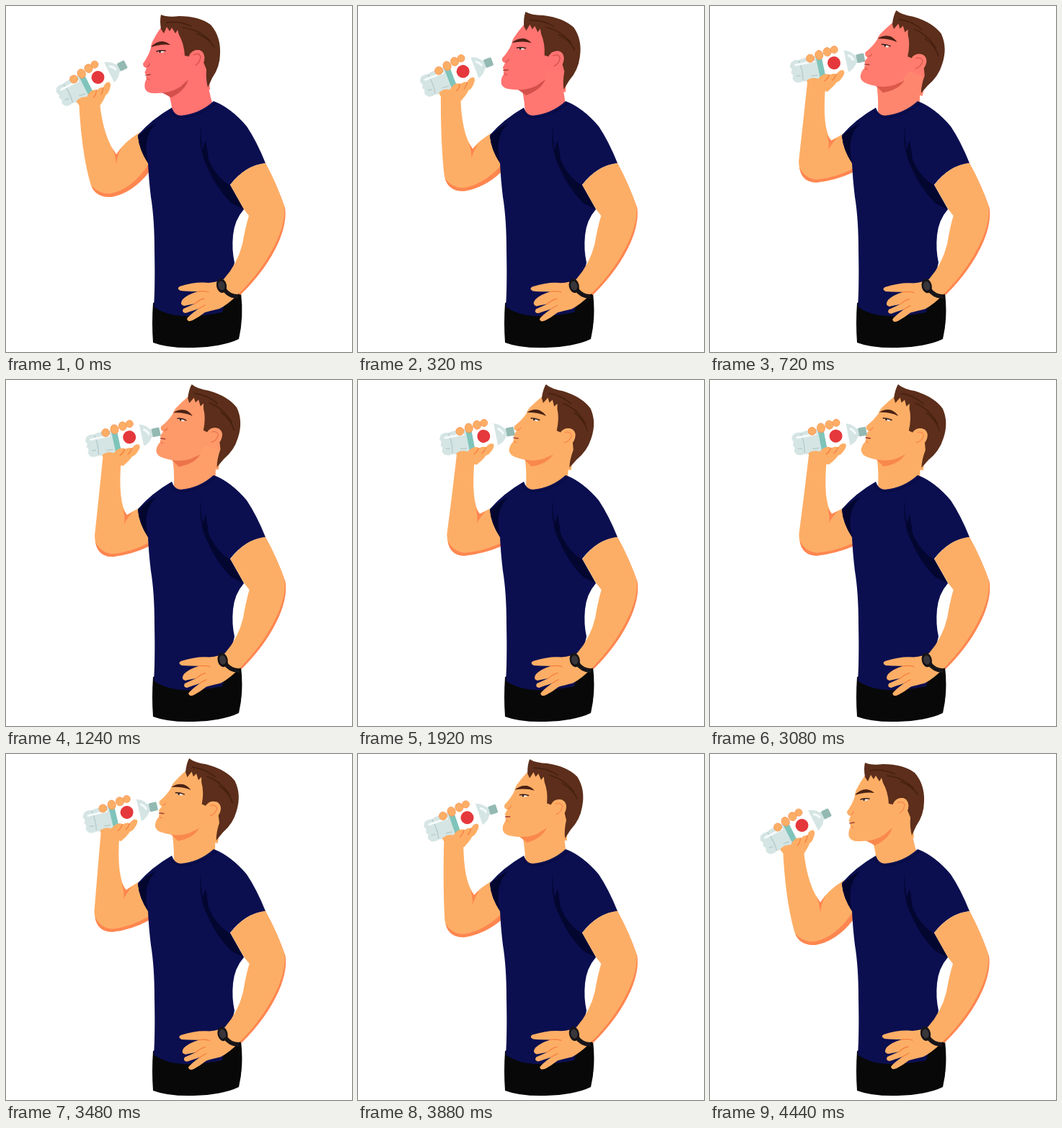
Write an HTML page that moves like this. It is 480 px wide and 480 px high and loops after 5000 ms.

```html
<!DOCTYPE html>
<html lang="en">
<head>
<meta charset="utf-8">
<title>Drinking water</title>
<style>
  html, body { margin: 0; width: 100%; height: 100%; overflow: hidden; background: #fff; }
  svg { display: block; width: 100%; height: 100%; }
  .skin { fill: #fdae66; }
  .shade { fill: #ff8650; }
  .line { fill: none; stroke: #f5803f; stroke-width: 1.3; stroke-linecap: round; }
  .face { fill: var(--face); }
  .neck { fill: var(--neck); }
  .faceShade { fill: var(--faceShade); }
  .faceLine { fill: none; stroke: var(--faceShade); stroke-width: 1.3; stroke-linecap: round; }
</style>
</head>
<body>
<svg viewBox="0 0 480 480">
  <path id="neck" class="neck"/>
  <path id="arm" class="skin"/>
  <path id="armShade" class="shade"/>
  <path id="crook" class="shade"/>

  <!-- shorts and shirt -->
  <path fill="#080808" d="M204 412 Q202 440 204 467 Q225 475 260 474 Q300 473 323 462 Q330 432 326 398 L300 380Z"/>
  <path fill="#0b0f50" d="M230 141 Q234 152 242 152 Q268 150 288 132 Q312 141 334 167 Q348 188 360 218 Q332 221 311 248 L330 282 Q317 297 315 318 Q313 338 317 356 L300 425 Q270 431 245 430 Q219 428 205 417 Q207 390 206 340 Q206 295 201 265 Q198 240 197 218 Q184 198 183 179 Q202 157 230 141Z"/>
  <path fill="#03062f" d="M209 162 Q192 178 195 206 L197 218 Q185 200 183 181 Q196 168 209 162Z"/>
  <path fill="#03062f" d="M270 166 Q267 200 279 223 Q291 252 313 274 L330 282 L311 249 Q292 238 281 213 Q279 196 277 187 Q274 194 273 200 Q270 185 270 166Z"/>
  <path fill="none" stroke="#060a3e" stroke-width="1.2" d="M227 144 Q234 156 244 155 Q272 152 292 134"/>

  <!-- arm resting on the hip -->
  <g id="hip">
    <path class="shade" d="M360 218 Q376 248 387 280 Q390 300 378 328 Q361 366 325 401 L312 390 L340 290Z"/>
    <path class="skin" d="M360 218 Q376 248 386 278 Q388 298 376 325 Q357 366 322 400 Q308 414 296 420 Q283 423 276 425 Q267 432 259 436 Q252 439 251 434 Q253 430 267 420 Q255 424 249 426 Q243 425 246 420 L262 413 Q252 415 247 416 Q240 414 245 407 Q252 400 266 396 Q252 396 242 395 Q236 392 241 389 Q264 382 281 384 Q294 383 302 379 Q321 358 328 330 Q332 307 337 291 L330 282 L311 248 Q332 221 360 218Z"/>
    <path class="line" d="M266 396 Q275 395 281 397 M262 413 Q269 407 275 406 M267 420 L276 415"/>
    <path fill="none" stroke="#17151a" stroke-width="6" d="M302 392 Q309 403 322 403"/>
    <ellipse cx="299" cy="388" rx="7" ry="10" fill="#151317" transform="rotate(-12 299 388)"/>
    <ellipse cx="299" cy="388" rx="4.6" ry="6.4" fill="#38363b" transform="rotate(-12 299 388)"/>
  </g>

  <g id="head">
    <path class="neck" d="M250 86 L280 84 L283 116 L262 118Z"/>
    <path class="faceShade" d="M214 119 Q240 116 253 102 Q249 117 229 127 Q224 124 214 119Z"/>
    <path class="face" d="M217 27 Q209 38 205 46 Q201 52 201 58 Q198 69 190 80 Q190 85 195 86 L193 91 Q191 93 196 96 Q193 98 195 101 Q191 108 193 115 Q196 121 205 121 Q227 122 242 112 Q252 104 255 88 L278 90 L274 55 L240 20Z"/>
    <path fill="#5c2e1b" d="M215 12 Q224 16 240 14 Q268 14 284 26 Q298 42 297 66 Q297 84 286 100 L280 113 Q277 102 278 88 L274 78 Q277 63 267 61 Q258 61 254 70 L248 69 Q247 52 240 40 L238 33 L235 38 L230 30 L227 35 L223 29 L219 38 L215 32 Q213 20 215 12Z"/>
    <path fill="none" stroke="#45200f" stroke-width="1.5" d="M222 23 Q240 20 257 28 M245 30 Q267 32 283 48 M264 38 Q281 44 289 57"/>
    <path class="face" d="M254 69 Q258 60 268 61 Q277 64 275 76 Q272 87 260 88 Q253 85 254 69Z"/>
    <path class="faceLine" d="M260 68 Q267 64 270 70 Q269 79 263 82"/>
    <path fill="#4a2114" d="M201 57 Q208 49 217 49 Q224 50 228 54 Q216 52 201 57Z"/>
    <path fill="#f4eee8" d="M210 64 L220 61 L218 65Z"/>
    <path fill="none" stroke="#3c1c16" stroke-width="1.5" stroke-linecap="round" d="M209 63 Q214 61 221 62"/>
    <circle cx="213.5" cy="63.5" r="1.4" fill="#2a2328"/>
    <path fill="none" stroke="#a43d32" stroke-width="1.6" stroke-linecap="round" d="M194 96 L200 95"/>
    <path class="faceLine" d="M196 84 Q199 83 199 80 M196 101 L199 102"/>
  </g>

  <!-- bottle drawn along its own axis, cap on the right -->
  <g id="bottle">
    <path class="skin" d="M-34 12 L-31 24 L-8 36 L2 28 L12 8 L-10 -14 L-28 -12Z"/>
    <path fill="#d5e5e4" d="M-49 -14 Q-44 -17 -38 -15 Q-32 -17 -26 -16 L24 -16 Q34 -14 39 -6 L42 -5 L42 5 L39 6 Q34 14 24 16 L-26 16 Q-32 17 -38 15 Q-44 17 -49 14 L-52 9 L-50 4 L-52 0 L-50 -4 L-52 -9Z"/>
    <path fill="none" stroke="#b5cccb" stroke-width="1.4" d="M-38 -14 Q-35 0 -38 14 M-46 6 L-40 7 M-26 10 L-17 11"/>
    <path fill="none" stroke="#f5fbfa" stroke-width="3" stroke-linecap="round" d="M-44 -9 H-18 M31 -7 Q35 -4 36 0"/>
    <rect x="-14" y="-16" width="8" height="32" fill="#7fc4bb"/>
    <rect x="-6" y="-16" width="32" height="32" fill="#fff"/>
    <rect x="41" y="-6" width="11" height="12" rx="1.5" fill="#93b9b2"/>
    <circle cx="9" cy="-1" r="9" fill="#e5383c"/>
    <g class="skin" stroke="#f5914f" stroke-width=".7">
      <ellipse cx="-22" cy="-14" rx="5.5" ry="5.5"/>
      <ellipse cx="-9" cy="-16" rx="5.5" ry="6.5"/>
      <ellipse cx="3" cy="-18" rx="5.5" ry="6"/>
      <ellipse cx="13" cy="-19" rx="5" ry="5"/>
    </g>
    <path class="skin" d="M-33 15 Q-25 11 -17 16 Q-7 8 0 14 Q6 12 9 15 Q15 9 20 12 Q22 16 15 22 Q11 26 7 26 Q2 31 -8 36 L-31 25Z"/>
    <path class="line" d="M9 15 Q6 20 2 22 M-1 14 Q-4 19 -9 21"/>
  </g>
</svg>
<script>
const LOOP = 5000, STEP = 40, RAISED = 700, LOWER = 3360, DOWN = 4440, GULP = 1040;
const el = id => document.getElementById(id);
const lerp = (a, b, p) => a + (b - a) * p;
const clamp = v => Math.min(1, Math.max(0, v));
const ease = v => (1 - Math.cos(Math.PI * clamp(v))) / 2;

// Each shape has a lowered and a raised outline with matching points.
const shapes = {
  neck: [
    "M222 112 Q228 124 231 147 L244 162 L289 142 Q279 118 279 85 L250 85Z",
    "M230 104 Q234 122 233 147 L244 162 L291 142 Q290 126 293 104 L265 85Z"],
  arm: [
    "M186 175 Q162 190 153 206 Q135 182 130 134 L101 128 Q104 200 117 246 Q123 266 146 265 Q175 260 202 224Z",
    "M186 177 Q174 183 168 187 Q155 170 160 110 L135 104 Q129 162 123 216 Q124 245 148 245 Q175 242 202 228Z"],
  armShade: [
    "M118 249 Q125 266 146 265 Q175 260 198 231 L198 219 Q175 254 146 260 Q130 262 118 249Z",
    "M124 224 Q127 245 148 245 Q175 242 198 231 L198 226 Q172 239 148 241 Q132 240 124 224Z"],
  crook: [
    "M147 196 Q151 203 153 220 Q154 208 160 197 L153 206Z",
    "M162 179 Q166 190 164 200 Q168 192 176 183 L168 187Z"]
};
const numbers = /\d+/g;

function blend(low, high, p) {
  const ends = high.match(numbers);
  let i = 0;
  return low.replace(numbers, n => lerp(+n, +ends[i++], p).toFixed(2));
}

const tint = (a, b, p) => `rgb(${a.map((v, i) => Math.round(lerp(v, b[i], p)))})`;
const skinTone = p => tint([255, 115, 113], [253, 174, 102], p);

function draw(t) {
  const lift = t < LOWER ? ease(t / RAISED) : 1 - ease((t - LOWER) / (DOWN - LOWER));
  const p = lift * (1 + .07 * Math.cos(2 * Math.PI * (t - 2000) / GULP));

  for (const id in shapes) el(id).setAttribute("d", blend(...shapes[id], p));
  el("head").setAttribute("transform", `rotate(${16 * p} 258 162)`);
  el("hip").setAttribute("transform", `rotate(${-.6 * p} 335 230)`);
  el("bottle").setAttribute("transform",
    `translate(${lerp(120, 163, p)} ${lerp(104, 82, p)}) rotate(${lerp(-27, -12, p)})`);

  // The flushed skin cools down while drinking.
  const cool = ease((t - 300) / 1600), css = document.documentElement.style;
  css.setProperty("--face", skinTone(cool));
  css.setProperty("--neck", skinTone(ease(t / 1900)));
  css.setProperty("--faceShade", tint([212, 80, 74], [249, 136, 76], cool));
}

const start = performance.now();
function tick() {
  const t = (performance.now() - start) % LOOP;
  draw(Math.floor(t / STEP) * STEP);
  requestAnimationFrame(tick);
}
tick();
</script>
</body>
</html>
```
